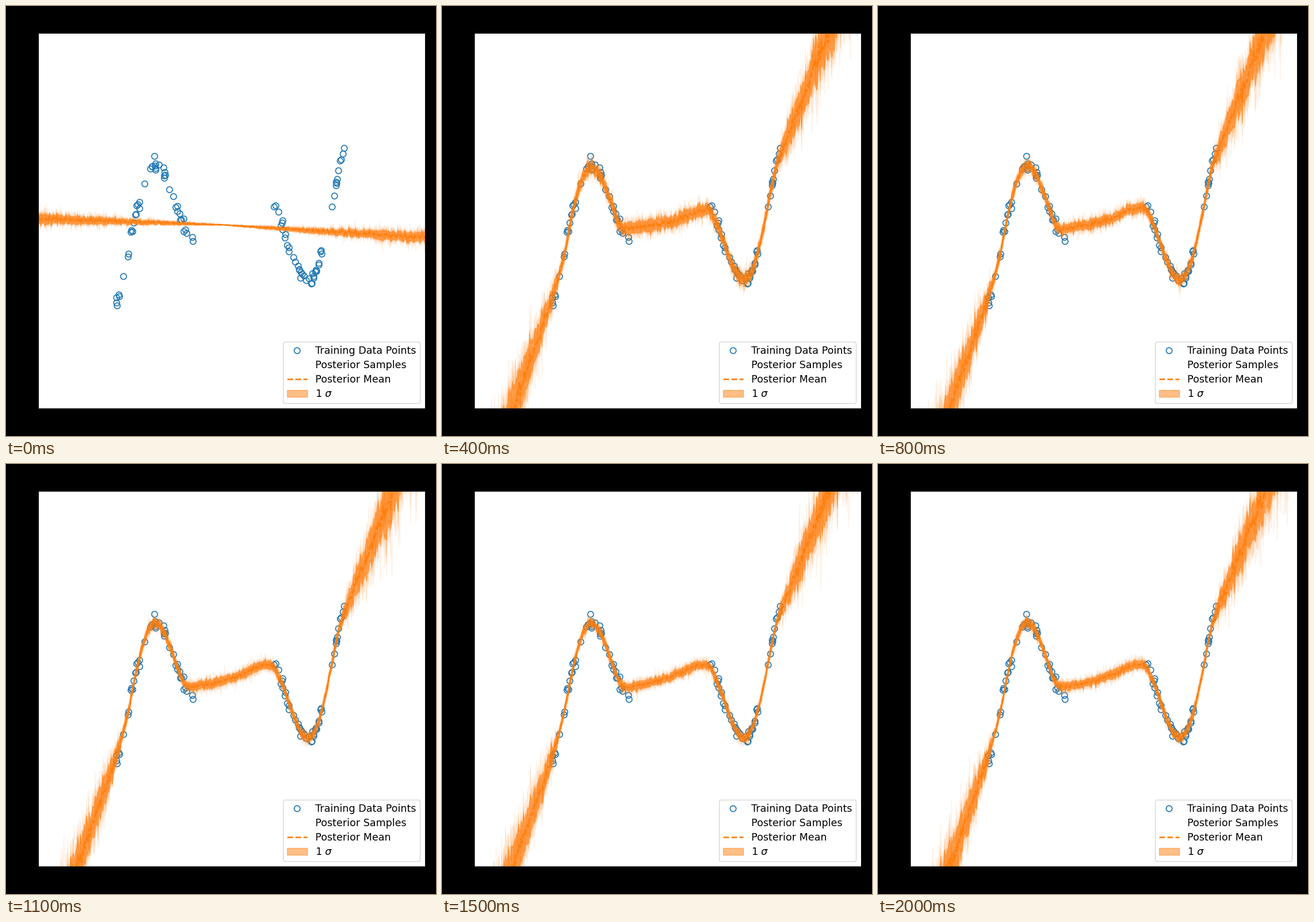
Write a matplotlib script that moves like this. It is 748x748 px and loops after 2100 ms.

```python
import numpy as np
import matplotlib.pyplot as plt
from matplotlib.animation import FuncAnimation
from matplotlib.collections import LineCollection

SIZE, DPI = 748, 100
LEFT, RIGHT, TOP, BOTTOM = 56, 729, 47, 700
FRAMES, STEP_MS = 21, 100
N_POINTS, N_SAMPLES = 47, 20
CX, CY = 392, 376  # centre of the point symmetry
BLUE, ORANGE = "tab:blue", "tab:orange"


def truth(x):
    """Odd wave whose amplitude grows away from the centre."""
    u = x - CX
    return CY + 0.78 * u * np.sin(np.pi * (np.abs(u) - 86) / 83)


def bump(x, centre, width):
    return np.exp(-((x - centre) / width) ** 2)


def make_data():
    rng = np.random.default_rng(7)
    px = np.concatenate([rng.uniform(191, 325, N_POINTS),
                         rng.uniform(461, 590, N_POINTS)])
    return px, truth(px) + rng.normal(0, 7, px.size)


def make_fit(x):
    """Follows the data, bridges the gap and runs straight outside."""
    left, right = np.arange(210, 312, 4), np.arange(482, 584, 4)
    ends = [(50, 897), (124, 699), (190, 512)]
    gap = [(324, 387), (360, 381), (400, 369), (440, 350), (464, 347)]
    tail = [(592, 248), (672, 47), (735, -111)]
    knots = np.vstack([ends, np.c_[left, truth(left)], gap,
                       np.c_[right, truth(right)], tail])
    return np.mean([np.interp(x + d, *knots.T) for d in range(-6, 7, 2)], axis=0)


x = np.linspace(LEFT, RIGHT, 500)
fit = make_fit(x)
prior = np.interp(x, [57, 375, 728], [369, 380, 402])
prior_sd = 0.4 + 7.5 * np.abs(x - 380) / 320
beyond = np.maximum(0, np.abs(x - CX) - 190)  # distance outside the data


def posterior(i):
    """Mean and standard deviation of the model after i training steps."""
    learned = 1 - 0.25 ** i
    lag = np.exp((4 - i) / 4)
    mean = fit + lag * (8 * bump(x, 430, 50) + 6 * bump(x, 258, 25))
    sd = np.hypot(6.5 + 3 * lag, 4 * np.sqrt(beyond))
    return prior + learned * (mean - prior), prior_sd + learned * (sd - prior_sd)


fig = plt.figure(figsize=(SIZE / DPI, SIZE / DPI), dpi=DPI, facecolor="black")
ax = fig.add_axes([LEFT / SIZE, 1 - BOTTOM / SIZE,
                   (RIGHT - LEFT) / SIZE, (BOTTOM - TOP) / SIZE])
# Half a pixel of shift puts whole numbers on pixel centres
ax.set(xlim=(LEFT - 0.5, RIGHT - 0.5), ylim=(BOTTOM - 0.5, TOP - 0.5),
       xticks=[], yticks=[])

points, = ax.plot(*make_data(), "o", ms=7.4, mew=1.2, mfc="none", mec=BLUE,
                  zorder=1, label="Training Data Points")
band = ax.fill_between(x, prior, prior, color=ORANGE, alpha=0.5, zorder=1.5,
                       label=r"1 $\sigma$")
samples = LineCollection([], colors=ORANGE, alpha=0.12, linewidths=0.9, zorder=2)
ax.add_collection(samples, autolim=False)
blank, = ax.plot([], [], alpha=0, label="Posterior Samples")
mean_line, = ax.plot(x, prior, "--", color=ORANGE, lw=1.9, zorder=2.2,
                     label="Posterior Mean")
ax.legend(handles=[points, blank, mean_line, band], loc="lower right",
          fontsize=12.6, labelspacing=0.4)


def update(i):
    rng = np.random.default_rng(100 + i)
    mean, sd = posterior(i)
    draws = mean + sd * rng.standard_normal((N_SAMPLES, x.size))
    mu, sigma = draws.mean(axis=0), draws.std(axis=0)
    samples.set_segments([np.column_stack([x, d]) for d in draws])
    mean_line.set_ydata(mu)
    band.set_verts([np.column_stack([np.r_[x, x[::-1]],
                                     np.r_[mu - sigma, (mu + sigma)[::-1]]])])
    return samples, mean_line, band


anim = FuncAnimation(fig, update, frames=FRAMES, interval=STEP_MS,
                     init_func=lambda: update(0), repeat=True, repeat_delay=0)
plt.show()
```
